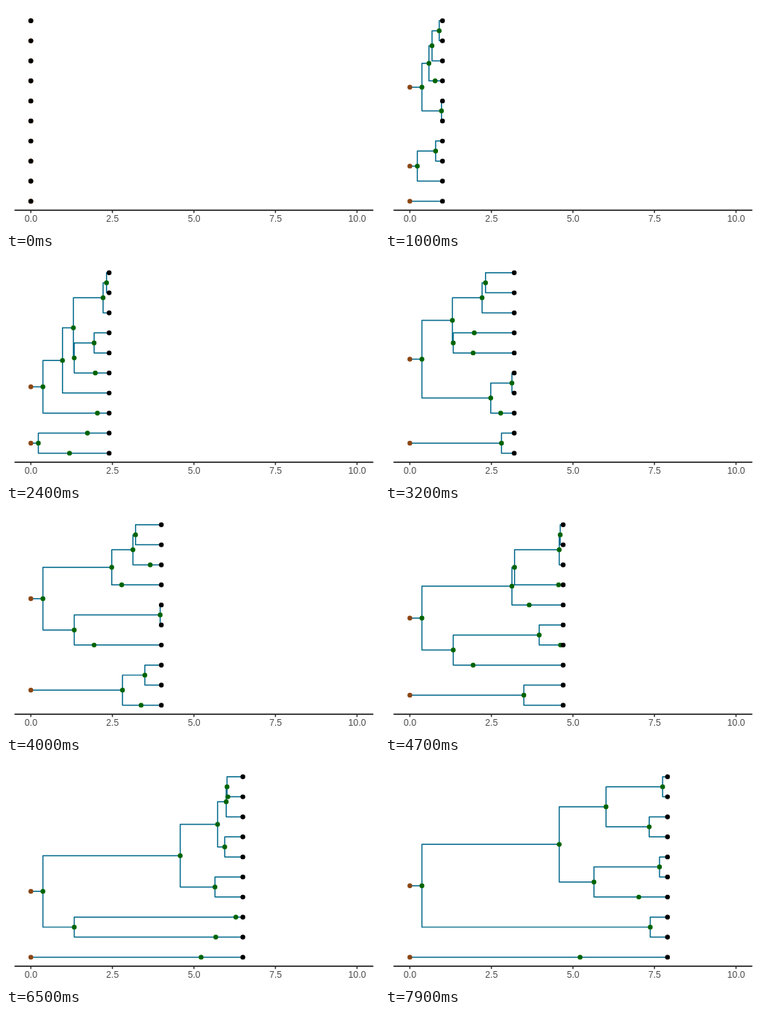
Recreate the animation shown at these times as an HTML page. Size 500 by 300 pixels, loop 8000 ms.

```html
<!DOCTYPE html>
<html lang="en">
<head>
<meta charset="utf-8">
<title>Lineages through time</title>
<style>
  html, body { margin: 0; width: 100%; height: 100%; overflow: hidden; background: #fff; }
  svg { display: block; width: 500px; height: 300px; }
  path { fill: none; }
  #axis, #ticks { stroke: #000; stroke-width: 1.48; }
  #ticks { stroke: #333; }
  #branches { stroke: #00688b; stroke-width: 1.48; stroke-linejoin: round; }
  .dots { stroke-width: 6.4; stroke-linecap: round; }
  #roots { stroke: #8b4513; }
  #splits { stroke: #006400; }
  #tips { stroke: #000; }
  text { font: 12.2px "Liberation Sans", Arial, sans-serif; fill: #4d4d4d; text-anchor: middle; }
</style>
</head>
<body>
<svg viewBox="0 0 500 300">
  <path id="axis" d="M11.4 273.5H492.4"/>
  <path id="ticks"/>
  <g id="labels"></g>
  <path id="branches"/>
  <path id="roots" class="dots"/>
  <path id="splits" class="dots"/>
  <path id="tips" class="dots"/>
</svg>
<script>
const STEP = 100, STEPS = 80, SIZE = 10;

// A line splits or merely renews itself at its key times. Each split founds a new line.
const line = (splits = [], renews = []) => ({ splits, renews });
const founders = [
  line([.37, .585, .68, .9, 2.48, 3.13, 3.21, 4.58, 4.85, 5.725, 5.99, 6.015, 7.75], [2.04]),
  line([.23, .79, 2.81, 3.495, 4.815, 5.22], [1.735, 8.2])
];
// Active side lines by founding time; all others stay idle.
const sideLines = {
  .23: line([], [1.185]),
  .37: line([.97, 1.305, 1.33, 1.94], [5.67]),
  .585: line([], [.775]),
  1.305: line([2.215, 2.32]),
  1.33: line([3.965, 7.37], [1.975, 4.62, 6.285]),
  2.48: line([], [2.785]),
  2.81: line([], [3.38]),
  3.13: line([], [3.66]),
  3.21: line([], [4.56]),
  4.58: line([4.61, 5.645, 7.655], [5.43]),
  5.645: line([], [7.02]),
  5.725: line([5.945]),
  6.015: line([7.34], [6.04])
};

const $ = id => document.getElementById(id);
const xAt = t => 33.32 + 43.72 * t;
const yAt = row => 19.72 + 26.855 * row;
const put = (id, d) => $(id).setAttribute("d", d);
const dot = n => `M${xAt(n.t).toFixed(2)} ${n.y.toFixed(2)}h.01`;

const nextEvent = (line, after) =>
  Math.min(...[...line.splits, ...line.renews].filter(t => t > after));

// Constant population: every split removes the longest idle line.
function populate(now) {
  const roots = Array.from({ length: SIZE }, () => ({ t: 0, kids: new Set() }));
  let alive = roots.map((node, i) => ({ line: founders[i] || line(), node }));
  for (let t = 0; ;) {
    const next = l => nextEvent(l.line, t);
    const actor = alive.reduce((a, b) => next(b) < next(a) ? b : a);
    const at = next(actor);
    if (at > now) break;
    actor.node = { t: at, up: actor.node, kids: new Set() };
    if (actor.line.splits.includes(at)) {
      const victim = alive.filter(l => next(l) === Infinity)
        .reduce((a, b) => b.node.t < a.node.t ? b : a);
      alive = alive.filter(l => l !== victim);
      alive.push({ line: sideLines[at] || line(), node: actor.node });
    }
    t = at;
  }
  for (const { node } of alive) {
    node.kids.add({ t: now, tip: true });
    for (let n = node; n.up; n = n.up) n.up.kids.add(n);
  }
  return roots.filter(r => r.kids.size);
}

// Drop inner nodes with one branch left; larger, then younger, clades first.
function tidy(node) {
  if (node.tip) return { ...node, size: 1, kids: [] };
  const kids = [...node.kids].map(tidy);
  if (node.up && kids.length === 1 && !kids[0].tip) return kids[0];
  kids.sort((a, b) => b.size - a.size || b.t - a.t);
  return { t: node.t, root: !node.up, kids, size: kids.reduce((s, k) => s + k.size, 0) };
}

function draw(now) {
  let row = 0;
  const out = { branches: "", roots: "", splits: "", tips: "" };

  function place(n) {
    n.kids.forEach(place);
    n.y = n.tip ? yAt(row++) : n.kids.reduce((s, k) => s + k.y, 0) / n.kids.length;
    for (const k of n.kids) {
      out.branches += `M${xAt(n.t).toFixed(2)} ${n.y.toFixed(2)}V${k.y.toFixed(2)}H${xAt(k.t).toFixed(2)}`;
    }
    out[n.tip ? "tips" : n.root ? "roots" : "splits"] += dot(n);
  }

  populate(now).map(tidy)
    .sort((a, b) => b.size - a.size || b.kids[0].t - a.kids[0].t)
    .forEach(place);
  for (const id in out) put(id, out[id]);
}

const marks = Array.from({ length: 5 }, (_, i) => i * 2.5);
put("ticks", marks.map(t => `M${xAt(t)} 273.5v3.8`).join(""));
$("labels").innerHTML = marks
  .map(t => `<text x="${xAt(t) + .2}" y="289">${t.toFixed(1)}</text>`).join("");

const start = performance.now();
let shown = -1;
function tick() {
  const step = Math.floor((performance.now() - start) / STEP) % STEPS;
  if (step !== shown) draw((shown = step) / 10);
  requestAnimationFrame(tick);
}
tick();
</script>
</body>
</html>
```
